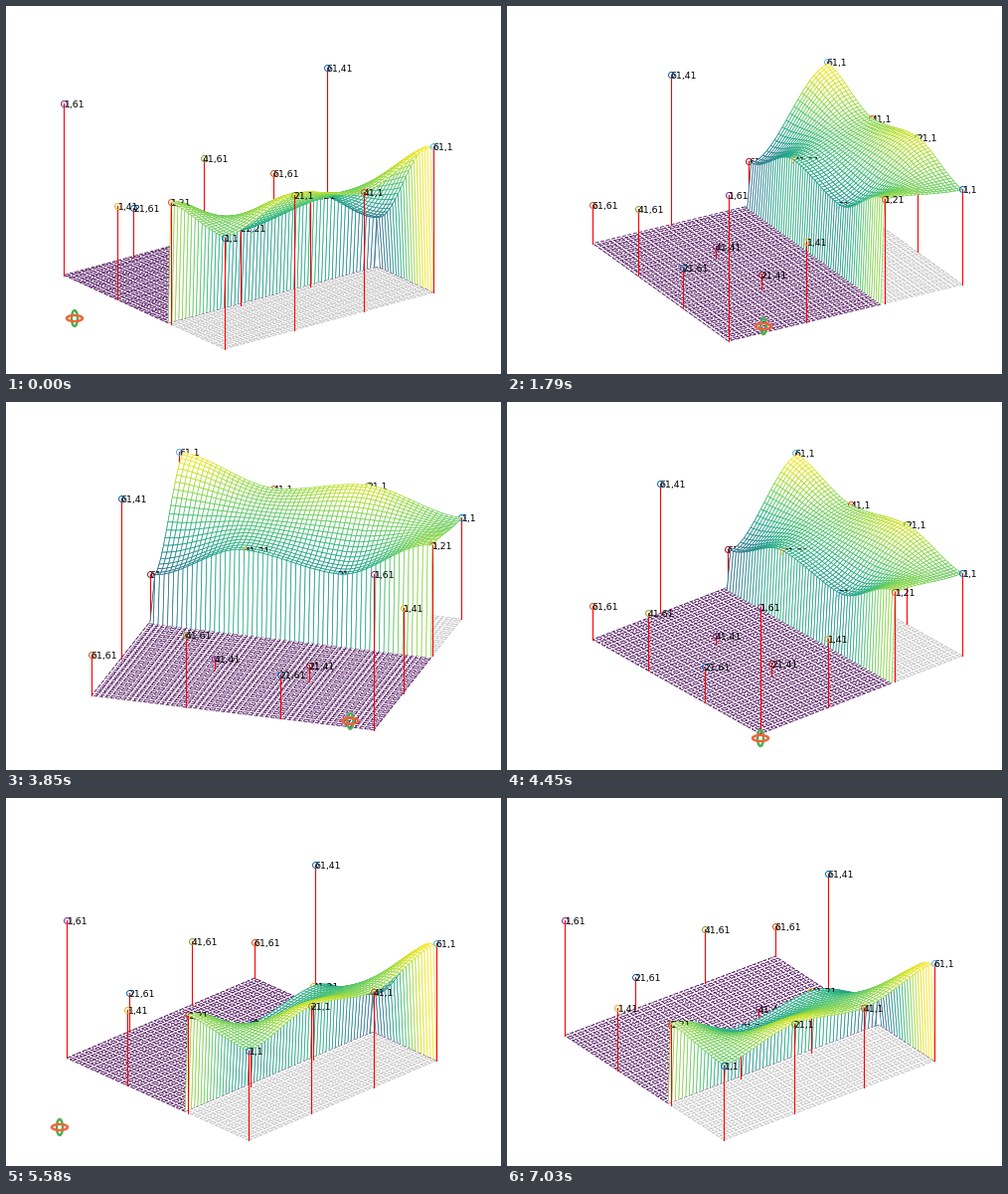
A matplotlib script for the animation above (8.15 s loop, 498 px wide and 370 px high).

```python
import numpy as np
import matplotlib.pyplot as plt
from matplotlib.animation import FuncAnimation
from matplotlib.collections import LineCollection, PolyCollection
from matplotlib.patches import Ellipse

W, H = 498, 370
LOOP, INTERVAL = 8150, 50
PX = 0.72  # points per pixel at 100 dpi
CYCLE = ["#0072bd", "#d95319", "#edb120", "#7e2f8e",
         "#77ac30", "#4dbeee", "#a2142f"]

# heights at the nodes i, j = 1, 21, 41, 61
NODES = np.array([[.592, .648, .498, .911],
                  [.716, .412, .092, .255],
                  [.632, .487, .068, .420],
                  [.778, .275, .934, .240]])
TICKS = range(1, 62, 20)
BOX = 70  # axis limits are 0..70 on the ground plane
LEFT, WIDTH, BOTTOM, HEIGHT = 30.5, 434, 347, 342.3

# pointer path: time, x, y
PATH = np.array([
    (60, 69, 314), (420, 48, 304), (670, 48, 304),
    (1250, 160, 317), (1325, 192, 320), (1775, 258, 322), (2450, 338, 319),
    (2920, 350, 320), (3850, 350, 320),
    (4400, 270, 334), (4475, 255, 338), (4725, 208, 342),
    (5500, 64, 326), (5575, 54, 331), (5940, 47, 337), (6120, 47, 337),
    (6420, 47, 343), (6850, 47, 343), (7025, 130, 357)])
DRAG_START, DRAG_END, LAG = 670, 6850, 75


def pointer_at(t):
    return [np.interp(t, PATH[:, 0], PATH[:, k]) for k in (1, 2)]


def angles_at(t):
    """Azimuth and elevation follow the dragged pointer with a short lag."""
    x, y = pointer_at(np.clip(t - LAG, DRAG_START, DRAG_END))
    x0, y0 = pointer_at(DRAG_START)
    return -37.5 - (x - x0) * 180 / WIDTH, 30 + (y - y0) * 180 / HEIGHT


def make_heights():
    """Smoothly blended first strip of cells, dropping to zero past its end."""
    def blend(n):
        cell, u = np.divmod(np.arange(n) / 20, 1)
        return cell.astype(int), u * u * (3 - 2 * u)

    ci, u = blend(60)
    cj, v = blend(21)
    u = u[:, None]
    rows = NODES[ci] * (1 - u) + NODES[ci + 1] * u
    z = np.zeros((61, 22))
    z[:60, :21] = rows[:, cj] * (1 - v) + rows[:, cj + 1] * v
    return z


class View:
    """Orthographic view whose bounding box is stretched to fill the axes."""

    def __init__(self, az, el):
        az, el = np.radians([az, el])
        self.c, self.s = np.cos(az), np.sin(az)
        self.sin_el, self.cos_el = np.sin(el), np.cos(el)
        span = BOX * (abs(self.c) + abs(self.s))
        self.sx = WIDTH / span
        self.sy = HEIGHT / (span * self.sin_el + BOX * self.cos_el)
        self.x_min = BOX * (min(self.c, 0) + min(self.s, 0))
        self.d_min = BOX * (min(-self.s, 0) + min(self.c, 0))

    def depth(self, i, j):
        return self.c * j - self.s * i

    def project(self, i, j, z):
        x = LEFT + self.sx * (self.c * i + self.s * j - self.x_min)
        rise = self.sin_el * (self.depth(i, j) - self.d_min)
        y = BOTTOM - self.sy * (rise + BOX * self.cos_el * z)
        return np.stack([x, y], axis=-1)


def floor_lines(j0, j1):
    """End points of the floor's grid lines in both directions."""
    along_j = [[(i, j0), (i, j1)] for i in range(1, 62)]
    along_i = [[(1, j), (61, j)] for j in range(j0, j1 + 1)]
    return along_j + along_i


Z = make_heights()
GI, GJ = np.meshgrid(np.arange(1, 62), np.arange(1, 23), indexing="ij")
QI, QJ = GI[:-1, :-1] + .5, GJ[:-1, :-1] + .5
QCOLOR = plt.cm.viridis(Z[:-1, :-1] / Z.max()).reshape(-1, 4)

fig = plt.figure(figsize=(W / 100, H / 100), dpi=100, facecolor="white")
ax = fig.add_axes([0, 0, 1, 1])
ax.set_xlim(0, W)
ax.set_ylim(H, 0)
ax.axis("off")


def add_floor(color, lines):
    grid = LineCollection([], colors=color, linewidths=.8 * PX, zorder=1,
                          linestyles=[(0, (5, 2))])
    return ax.add_collection(grid), np.array(lines, float)


floors = [add_floor("#c0c0c0", floor_lines(1, 21)),
          add_floor("#440154", floor_lines(22, 61) + [[(61, 1), (61, 22)]])]

stems = []
for n, z in enumerate(NODES.flat):
    i, j = TICKS[n // 4], TICKS[n % 4]
    line, = ax.plot([], [], color="red", lw=1.1 * PX)
    ring, = ax.plot([], [], "o", ms=6 * PX, mfc="none", mew=PX,
                    mec=CYCLE[n % len(CYCLE)])
    label = ax.text(0, 0, f"{i},{j}", family="DejaVu Sans", size=9.4 * PX,
                    va="center_baseline", ha="left")
    stems.append((i, j, z, line, ring, label))
SI, SJ = (np.array([s[k] for s in stems]) for k in (0, 1))

layers = [ax.add_collection(PolyCollection([], closed=False, facecolor="white",
                                           lw=.75 * PX, zorder=10 + 4 * n))
          for n in range(len(stems) + 1)]

pointer = [Ellipse((0, 0), w, h, fill=False, ec=color, lw=2.4 * PX, zorder=200)
           for w, h, color in ((6, 16, "#4caf50"), (16, 6, "#f4623a"))]
for ring in pointer:
    ax.add_patch(ring)


def surface_quads(view):
    p = view.project(GI, GJ, Z)
    a, b, c, d = p[:-1, :-1], p[1:, :-1], p[1:, 1:], p[:-1, 1:]
    quads = np.stack([a, b, c, d, a], axis=2)
    # the drop-off faces keep their foot edge open
    quads[:, -1] = np.stack([d, a, b, c, c], axis=2)[:, -1]
    quads[-1] = np.stack([b, a, d, c, c], axis=2)[-1]
    return quads.reshape(-1, 5, 2)


def draw(frame):
    t = frame * INTERVAL + INTERVAL / 2
    view = View(*angles_at(t))

    for grid, lines in floors:
        grid.set_segments(view.project(lines[..., 0], lines[..., 1], 0))

    # far to near: slices of the surface with the stems in between
    depth = view.depth(QI, QJ).ravel()
    order = np.argsort(-depth, kind="stable")
    stem_depth = view.depth(SI, SJ)
    stem_order = np.argsort(-stem_depth, kind="stable")
    cuts = np.searchsorted(-depth[order], -stem_depth[stem_order])
    bounds = [0, *cuts, len(order)]
    quads = surface_quads(view)
    for layer, lo, hi in zip(layers, bounds, bounds[1:]):
        part = order[lo:hi]
        layer.set_verts(list(quads[part]), closed=False)
        layer.set_edgecolor(QCOLOR[part])

    for rank, k in enumerate(stem_order):
        i, j, z, line, ring, label = stems[k]
        x, y = view.project(i, j, z)
        foot = view.project(i, j, 0)[1]
        line.set_data([x, x], [foot, y])
        ring.set_data([x], [y])
        label.set_position((x - .5, y + .5))
        for artist in (line, ring, label):
            artist.set_zorder(12 + 4 * rank)

    for ring in pointer:
        ring.set_center(pointer_at(t))
        ring.set_visible(t < PATH[-1, 0])
    return []


anim = FuncAnimation(fig, draw, frames=LOOP // INTERVAL, interval=INTERVAL,
                     init_func=lambda: [], repeat=True, repeat_delay=0,
                     blit=False)
plt.show()
```
